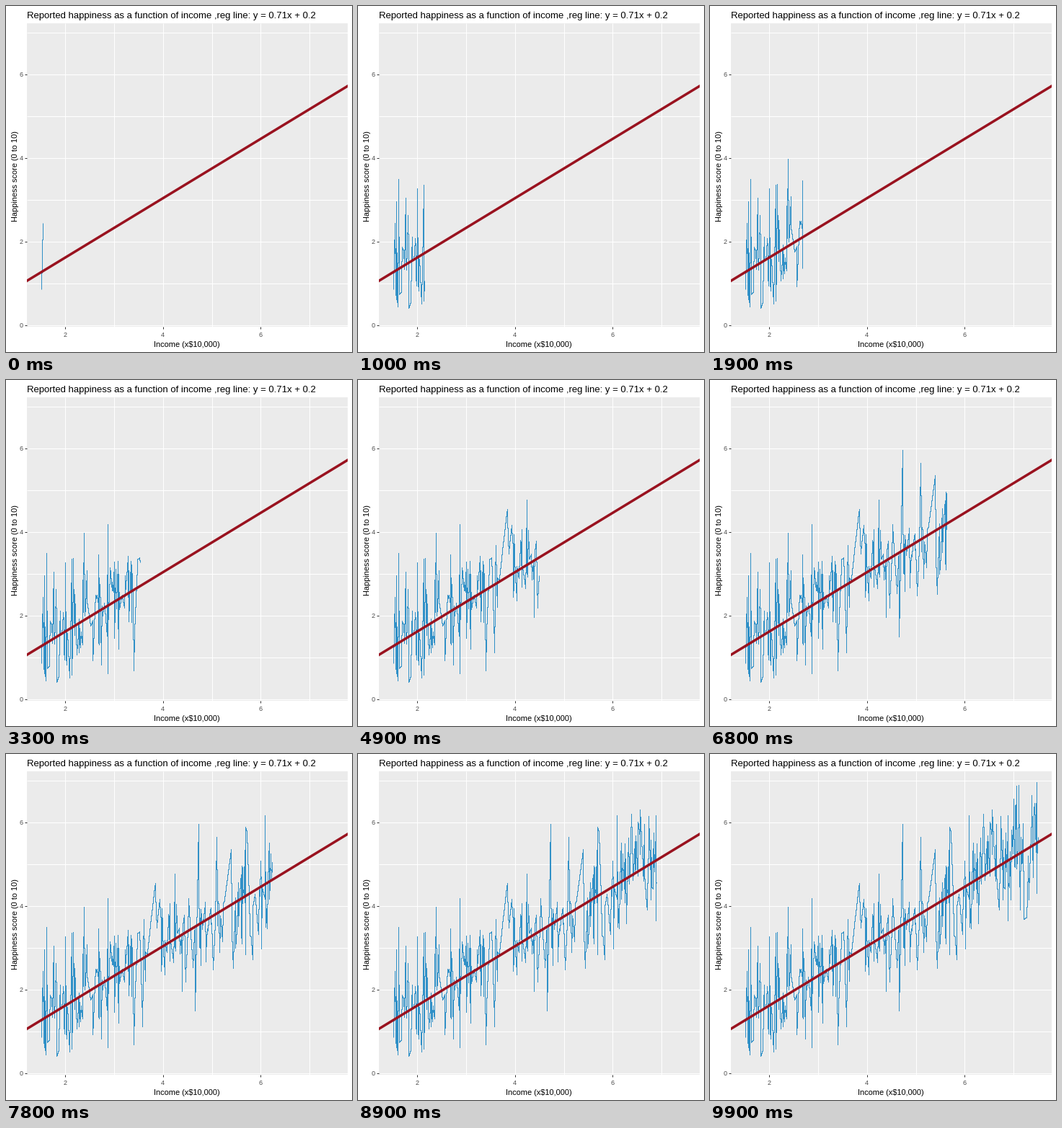
A matplotlib script for the animation above (10000 ms loop, 480x480 px).

```python
import numpy as np
import matplotlib.pyplot as plt
from matplotlib.animation import FuncAnimation
from matplotlib.patches import Rectangle

plt.rcParams["font.family"] = "Liberation Sans"
plt.rcParams["path.simplify"] = False

SIZE, DPI = 480, 80
PT = 72 / DPI  # points per pixel
FRAMES, INTERVAL = 100, 100
LEFT, RIGHT, TOP, BOTTOM = 29, 474, 24, 445
START, FIRST, LAST = 49.5, 51.5, 455
BLUE, RED = "#3090C7", "#99121F"


def px(income):
    return 82.1 + 67.8 * (income - 2)


def py(score):
    return 443 - 58 * score


def trend(x):
    """Height of the regression line at horizontal position x."""
    return py(0.71 * ((x - 82.1) / 67.8 + 2) + 0.2)


def survey():
    """Normal scatter about the trend, plus the most striking answers."""
    rng = np.random.default_rng(12)
    x = np.sort(rng.uniform(FIRST + 0.5, LAST, 330))
    y = trend(x) + np.clip(rng.normal(0, 0.72 * 58, x.size), -95, 95)
    y = np.minimum(y, py(0.27))
    striking = [(START, 393), (FIRST, 301), (56.5, 240), (108.5, 212),
                (141.5, 200), (177.5, 403), (234.5, 166), (262.5, 356),
                (267.5, 97), (292.5, 115), (334.5, 109), (379.5, 83),
                (391.5, 77), (425.5, 44), (446.5, 57), (LAST, 115)]
    points = np.vstack([striking, np.column_stack([x, y])])
    x, y = points[np.argsort(points[:, 0], kind="stable")].T
    # One extra sample per pixel column keeps long slopes smooth.
    dense = np.union1d(x, np.arange(START, LAST))
    return dense, np.interp(dense, x, y)


def pixel_steps(x, y):
    """Turn a polyline into crisp vertical runs on pixel columns."""
    middle = (y[1:] + y[:-1]) / 2
    runs = np.column_stack([np.append(y[0], middle), y,
                            np.append(middle, y[-1])])
    return np.repeat(np.floor(x) + 0.5, 3), np.floor(runs.ravel()) + 0.5


fig = plt.figure(figsize=(SIZE / DPI, SIZE / DPI), dpi=DPI, facecolor="white")
ax = fig.add_axes([0, 0, 1, 1])
ax.set(xlim=(0, SIZE), ylim=(SIZE, 0))
ax.axis("off")

panel = Rectangle((LEFT, TOP), RIGHT - LEFT, BOTTOM - TOP,
                  fc="#EBEBEB", ec="none")
ax.add_patch(panel)


def stroke(x, y, color, width=1.0, **kw):
    return ax.plot(x, y, color=color, lw=width * PT,
                   solid_capstyle="butt", **kw)[0]


def label(x, y, text, size, color="black", ha="center", va="baseline", **kw):
    ax.text(x, y, text, fontsize=size * PT, color=color, ha=ha, va=va, **kw)


for v in range(2, 8):
    stroke([px(v)] * 2, [TOP, BOTTOM], "white")
for v in range(8):
    stroke([LEFT, RIGHT], [py(v)] * 2, "white")
for v in (2, 4, 6):
    stroke([px(v)] * 2, [BOTTOM, BOTTOM + 3], "#333333")
    label(px(v), 459, str(v), 9, "#4D4D4D")
for v in (0, 2, 4, 6):
    stroke([LEFT - 3, LEFT], [py(v)] * 2, "#333333")
    label(24, py(v) + 3, str(v), 9, "#4D4D4D", ha="right")

label(29, 17, "Reported happiness as a function of income ,reg line: "
      "y = 0.71x + 0.2", 13.15, ha="left")
label(251, 473, "Income (x$10,000)", 11, parse_math=False)
label(18, 236, "Happiness score (0 to 10)", 11, ha="right", va="center",
      rotation=90)

xs, ys = survey()
line = stroke([], [], BLUE, zorder=3, snap=False)
ends = np.array([LEFT - 10, RIGHT + 10])
fit = stroke(ends, trend(ends), RED, 3.5, zorder=4)
fit.set_clip_path(panel)


def draw(i):
    tip = FIRST + (LAST - FIRST) * i / (FRAMES - 1)
    seen = xs <= tip
    line.set_data(*pixel_steps(np.append(xs[seen], tip),
                               np.append(ys[seen], np.interp(tip, xs, ys))))
    return line,


anim = FuncAnimation(fig, draw, frames=FRAMES, interval=INTERVAL,
                     repeat=True, repeat_delay=0)
plt.show()
```
